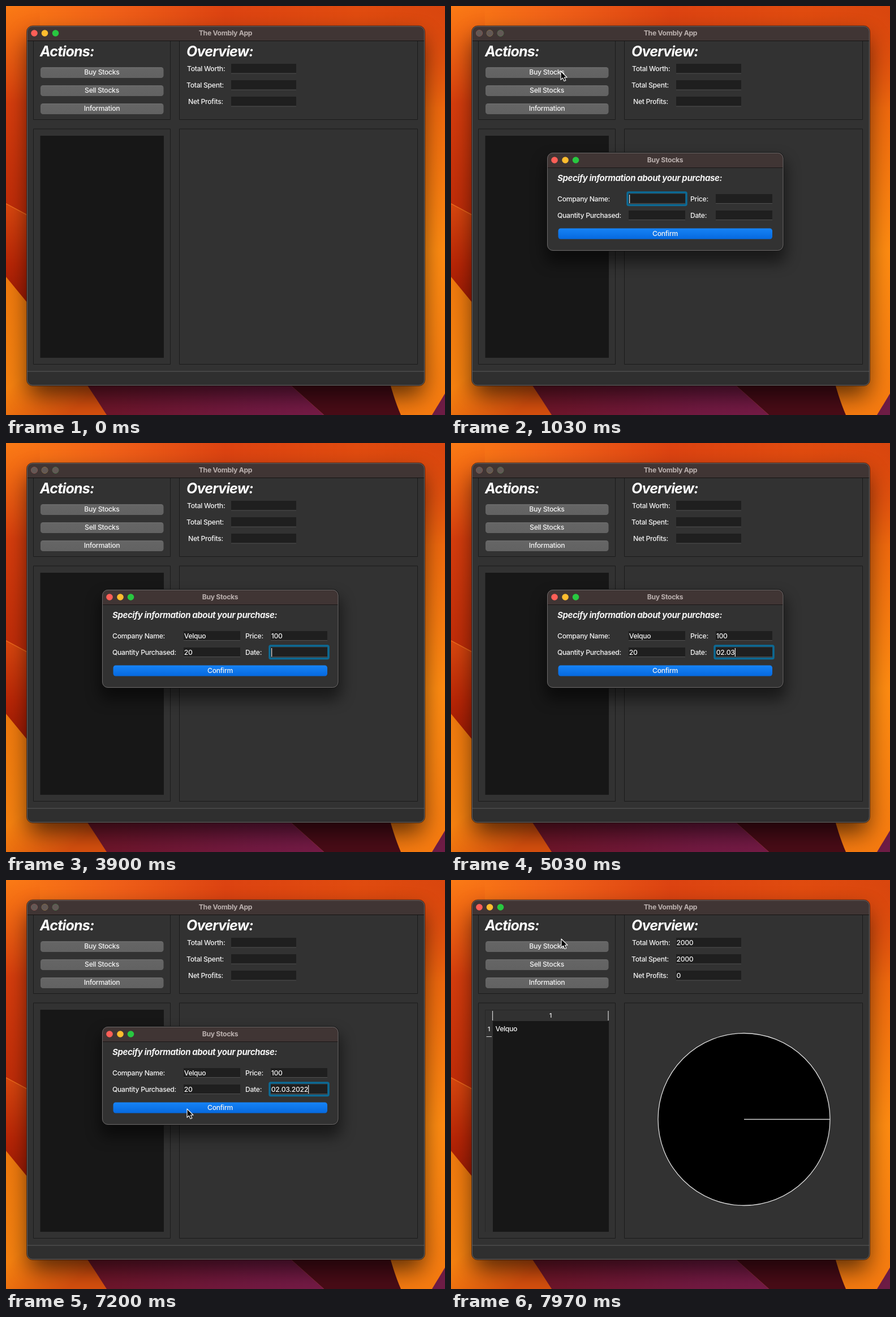
An HTML page that plays this animation: 776 by 722 pixels, repeating every 8 s.

```html
<!DOCTYPE html>
<html lang="en">
<head>
<meta charset="utf-8">
<title>Stock tracker</title>
<style>
html, body { margin: 0; width: 100%; height: 100%; overflow: hidden; background: #c22a0a; }
svg { display: block; width: 776px; height: 722px; }
text { font: 500 12.2px Inter, "Open Sans", sans-serif; letter-spacing: -.3px; fill: #f4f4f4; white-space: pre; }
.mid { text-anchor: middle; }
.title { font-weight: 700; fill: #b9afad; text-anchor: middle; }
.head { font: italic 700 25px Inter, "Open Sans", sans-serif; letter-spacing: -.8px; fill: #fff; }
.sub { font: italic 700 15px Inter, "Open Sans", sans-serif; letter-spacing: -.4px; }
.small { font-size: 11px; }
.panel { fill: none; stroke: #1b1b1b; }
</style>
</head>
<body>
<svg id="stage" viewBox="0 0 776 722" xmlns="http://www.w3.org/2000/svg">
  <defs>
    <linearGradient id="sky">
      <stop offset="0" stop-color="#fb7b15"/><stop offset=".25" stop-color="#ef5f18"/>
      <stop offset=".5" stop-color="#dc4311"/><stop offset=".8" stop-color="#e04b0f"/>
      <stop offset="1" stop-color="#d9460e"/>
    </linearGradient>
    <linearGradient id="left" x2="0" y2="1">
      <stop offset="0" stop-color="#e0480f" stop-opacity="0"/><stop offset=".45" stop-color="#d63d0d"/>
      <stop offset="1" stop-color="#bd2a08"/>
    </linearGradient>
    <linearGradient id="fold" x2="0" y2="1">
      <stop offset="0" stop-color="#d9480f"/><stop offset=".5" stop-color="#b92606"/><stop offset="1" stop-color="#8f1404"/>
    </linearGradient>
    <linearGradient id="petal" x2=".6" y2="1">
      <stop offset="0" stop-color="#f07a0e"/><stop offset=".6" stop-color="#f58110"/><stop offset="1" stop-color="#d8500e"/>
    </linearGradient>
    <linearGradient id="right" x2="0" y2="1">
      <stop offset="0" stop-color="#dc4a0e" stop-opacity="0"/><stop offset=".25" stop-color="#ef690e"/>
      <stop offset=".6" stop-color="#ff8c12"/><stop offset="1" stop-color="#f57a10"/>
    </linearGradient>
    <linearGradient id="plum">
      <stop offset="0" stop-color="#6e1526"/><stop offset=".5" stop-color="#741a43"/><stop offset="1" stop-color="#7a1d4e"/>
    </linearGradient>
    <linearGradient id="btn" x2="0" y2="1">
      <stop offset="0" stop-color="#6c6c6c"/><stop offset=".15" stop-color="#656565"/><stop offset="1" stop-color="#626262"/>
    </linearGradient>
    <linearGradient id="blue" x2="0" y2="1">
      <stop offset="0" stop-color="#1683f6"/><stop offset="1" stop-color="#0669df"/>
    </linearGradient>
    <filter id="soft" x="-20%" y="-20%" width="140%" height="150%"><feGaussianBlur stdDeviation="20"/></filter>
    <filter id="softer" x="-20%" y="-40%" width="140%" height="190%"><feGaussianBlur stdDeviation="13"/></filter>
  </defs>

  <g id="wall">
    <rect width="776" height="722" fill="url(#sky)"/>
    <rect width="60" height="380" fill="url(#left)"/>
    <path d="M0 349L60 381V560H0Z" fill="url(#fold)"/>
    <path d="M0 349L60 381" stroke="#ee6a1c" stroke-width="1.5"/>
    <path d="M120 640H776V722H120Z" fill="url(#plum)"/>
    <path d="M0 478L37 523Q100 600 178 722H0Z" fill="url(#petal)"/>
    <path d="M470 640L562 722H776V640Z" fill="#4a0c17"/>
    <path d="M470 640L562 722" stroke="#8d2a3c"/>
    <path d="M690 0H776V722H698Q684 690 672 640Z" fill="url(#right)"/>
    <path d="M776 684L753 722H776Z" fill="#6d1c45"/>
  </g>

  <g id="main">
    <rect x="40" y="56" width="697" height="632" rx="12" opacity=".62" filter="url(#soft)"/>
    <rect x="37" y="35.5" width="703" height="634.5" rx="10" fill="#323232"/>
    <path d="M37 61V45.5a10 10 0 0 1 10-10H730a10 10 0 0 1 10 10V61Z" fill="#403534"/>
    <path d="M37 645H740V660a10 10 0 0 1-10 10H47a10 10 0 0 1-10-10Z" fill="#2f2f2f"/>
    <path d="M37 61.5H740" stroke="#161414"/>
    <path d="M37 645H740" stroke="#5b5b5b"/>
    <rect x="36.5" y="35" width="704" height="635.5" rx="10.5" fill="none" stroke="#1c1210" stroke-opacity=".7"/>
    <rect x="37.5" y="36" width="702" height="633.5" rx="9.5" fill="none" stroke="#747070" stroke-opacity=".8"/>
    <path class="panel" d="M48.5 62V200.5H290.5V62M306.5 62V200.5H727.5V62M48.5 217H290.5V632.5H48.5ZM306.5 217H727.5V632.5H306.5Z"/>
    <text class="title" x="388" y="52">The Vombly App</text>
    <text class="head" x="60" y="88.5">Actions:</text>
    <text class="head" x="319" y="88.5">Overview:</text>
    <rect x="60.5" y="229" width="218.5" height="392" fill="#171717"/>
    <g id="result">
      <path d="M60.5 229H279V249H74V621H60.5Z" fill="#313131"/>
      <path d="M60.5 621V229.5H279" fill="none" stroke="#262626"/>
      <path d="M73.5 231V248M278 231V248M62.5 276.5H72" stroke="#d6d6d6" stroke-width="1.2"/>
      <text class="mid small" x="176" y="242.5">1</text>
      <text class="mid small" x="67" y="266.5">1</text>
      <text x="78.5" y="267">Velquo</text>
      <circle cx="518" cy="422.5" r="152" stroke="#dcdcdc" stroke-width="1.3"/>
      <path d="M518 422.5H670" stroke="#d0d0d0" stroke-width="1.5"/>
    </g>
  </g>

  <g id="dialog">
    <rect x="166" y="271" width="426" height="182" rx="14" opacity=".5" filter="url(#softer)"/>
    <rect x="170" y="259" width="417.5" height="173" rx="10" fill="#323232"/>
    <path d="M170 285V269a10 10 0 0 1 10-10H577.5a10 10 0 0 1 10 10V285Z" fill="#403534"/>
    <path d="M170 285.5H587.5" stroke="#1a1717"/>
    <rect x="169.5" y="258.5" width="418.5" height="174" rx="10.5" fill="none" stroke="#141414"/>
    <rect x="170.5" y="259.5" width="416.5" height="172" rx="9.5" fill="none" stroke="#6b6868"/>
    <text class="title" x="378.5" y="276">Buy Stocks</text>
    <text class="sub" x="188" y="309">Specify information about your purchase:</text>
    <rect x="189.5" y="392.5" width="378.5" height="19" rx="4.5" fill="url(#blue)"/>
    <text class="mid" x="378.5" y="406.3">Confirm</text>
  </g>

  <path id="arrow" d="M0 0V15.2L3.5 12L6 17.6L8.8 16.4L6.4 11H11Z" fill="#050505" stroke="#fff" stroke-width="1.1" stroke-linejoin="round"/>
</svg>
<script>
const LOOP = 8000;
const $ = id => document.getElementById(id);
const main = $('main'), dialog = $('dialog'), result = $('result'), arrow = $('arrow');

function add(parent, tag, attrs, text) {
  const el = document.createElementNS('http://www.w3.org/2000/svg', tag);
  for (const k in attrs) el.setAttribute(k, attrs[k]);
  if (text) el.textContent = text;
  parent.appendChild(el);
  return el;
}
const show = (el, on) => el.setAttribute('visibility', on ? 'visible' : 'hidden');
const clamp = v => Math.max(0, Math.min(1, v));
const span = (t, a, b) => clamp((t - a) / (b - a));
const ease = p => p * p * (3 - 2 * p);

function lights(parent, xs, y) {
  return xs.map((cx, i) => add(parent, 'circle',
    { cx, cy: y, r: 5.8, fill: ['#ff5f57', '#febc2e', '#28c840'][i] }));
}
function box(parent, x, y, w, h) {
  add(parent, 'rect', { x, y, width: w, height: h, fill: '#1f1f1f' });
  add(parent, 'path', { d: `M${x} ${y + h}h${w}`, stroke: '#505050' });
}

const mainLights = lights(main, [50, 68.5, 87.5], 48);
const greys = mainLights.map(c => add(main, 'circle',
  { cx: c.getAttribute('cx'), cy: 48, r: 5.8, fill: '#625855' }));
lights(dialog, [183, 202, 220.5], 272);

['Buy Stocks', 'Sell Stocks', 'Information'].forEach((label, i) => {
  const y = 108 + i * 32;
  add(main, 'rect', { x: 61, y, width: 217.5, height: 19, rx: 4.5, fill: 'url(#btn)' });
  add(main, 'text', { class: 'mid', x: 169.5, y: y + 13.3 }, label);
});

const totals = [['Total Worth:', 320, '2000'], ['Total Spent:', 319, '2000'], ['Net Profits:', 322, '0']]
  .map(([label, x, value], i) => {
    const y = 102 + i * 29;
    add(main, 'text', { x, y: y + 13.2 }, label);
    box(main, 398, y, 115, 17);
    return add(main, 'text', { x: 398.5, y: y + 13.2 }, value);
  });

// keys: time of each keystroke; focus: when the field is active
const fields = [
  { label: 'Company Name:', lx: 188, x: 314, y: 332, value: 'Velquo', focus: [0, 1700],
    keys: [1230, 1290, 1350, 1410, 1470, 1530] },
  { label: 'Price:', lx: 423, x: 468, y: 332, value: '100', focus: [1700, 3030], keys: [2570, 2770, 2870] },
  { label: 'Quantity Purchased:', lx: 188, x: 314, y: 361, value: '20', focus: [3030, 3830], keys: [3230, 3500] },
  { label: 'Date:', lx: 423, x: 468, y: 361, value: '02.03.2022', focus: [3830, LOOP],
    keys: [4400, 4530, 4670, 4800, 5030, 5170, 5500, 5600, 5830, 5930] }
];
for (const f of fields) {
  add(dialog, 'text', { x: f.lx, y: f.y + 12.7 }, f.label);
  box(dialog, f.x, f.y, 100, 16.5);
  f.ring = add(dialog, 'rect', { x: f.x - 2, y: f.y - 3, width: 104, height: 22.5, rx: 2,
    fill: 'none', stroke: '#0c6a95', 'stroke-width': 3.5 });
  f.text = add(dialog, 'text', { x: f.x + .8, y: f.y + 12.7 });
  f.caret = add(dialog, 'rect', { y: f.y + 1, width: 1.2, height: 15, fill: '#e8e8e8' });
}

const caretOff = [[2130, 2400], [4230, 4400], [6170, 6550], [6840, 7140]];

function drawField(f, t) {
  const active = t >= f.focus[0] && t < f.focus[1];
  const typed = f.value.slice(0, f.keys.filter(k => t >= k).length);
  if (f.text.textContent !== typed) f.text.textContent = typed;
  const grow = f.focus[0] ? ease(span(t, f.focus[0] - 30, f.focus[0] + 70)) : 1;
  const cx = f.x + 50, cy = f.y + 8.2, s = 1.12 - .12 * grow;
  f.ring.setAttribute('transform', `translate(${cx} ${cy}) scale(${s}) translate(${-cx} ${-cy})`);
  f.ring.setAttribute('opacity', active ? grow : 0);
  const lit = active && !caretOff.some(([a, b]) => t >= a && t < b);
  f.caret.setAttribute('opacity', lit ? 1 : 0);
  f.caret.setAttribute('x', f.x + 1 + (typed ? f.text.getComputedTextLength() : 0));
}

// pointer moves: start, end, from, to
const moves = [
  [110, 470, [-14, 300], [194, 115]],
  [6830, 7170, [194, 115], [320, 404]],
  [7600, 7970, [320, 404], [195, 104]]
];

function drawArrow(t) {
  show(arrow, t >= 130 && t < 1230 || t >= 6830);
  const m = moves.filter(v => t >= v[0]).pop() || moves[0];
  const p = ease(span(t, m[0], m[1]));
  const [x, y] = m[2].map((v, i) => v + (m[3][i] - v) * p);
  arrow.setAttribute('transform', `translate(${x.toFixed(2)} ${y.toFixed(2)})`);
}

function draw(t) {
  const open = span(t, 700, 1010);
  const scale = .5 + .5 * ease(open);
  const fade = 1 - span(t, 7330, 7540);
  dialog.setAttribute('opacity', Math.min(1, open * 2.35) * fade);
  dialog.setAttribute('transform', `translate(378.5 345.5) scale(${scale}) translate(-378.5 -345.5)`);
  dialog.setAttribute('display', t >= 730 && fade > 0 ? 'inline' : 'none');
  const done = t >= 7300;
  greys.forEach(c => show(c, t >= 730 && !done));
  show(result, done);
  totals.forEach(el => show(el, done));
  fields.forEach(f => drawField(f, t));
  drawArrow(t);
}

const start = performance.now();
function tick() {
  draw((performance.now() - start) % LOOP);
  requestAnimationFrame(tick);
}
tick();
</script>
</body>
</html>
```
